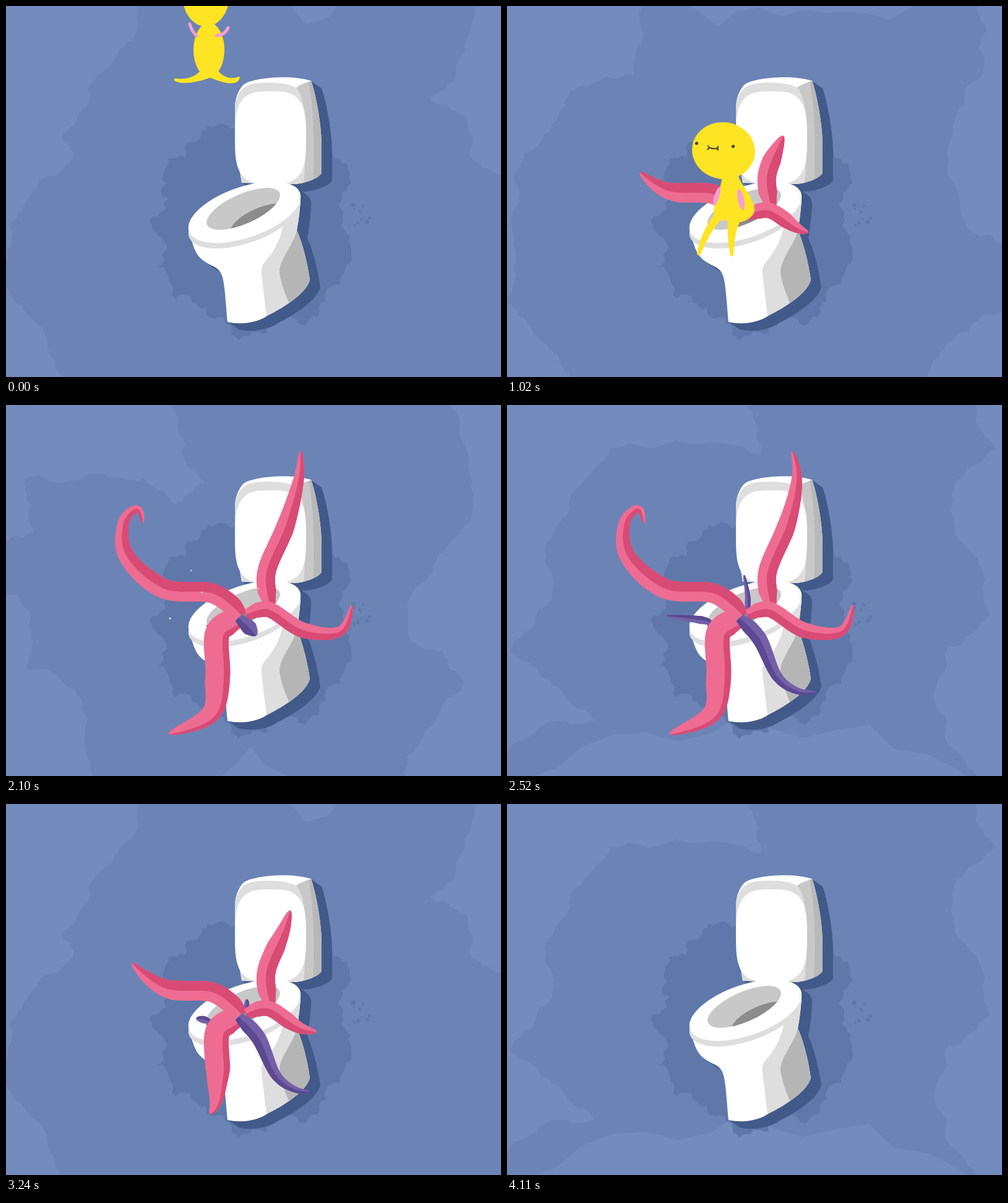
An HTML page with a canvas that plays this animation: 800 by 600 pixels, repeating every 4230 ms.

```html
<!DOCTYPE html>
<html>
<head>
<meta charset="utf-8">
<title>Toilet monster</title>
<style>
html, body { margin: 0; width: 100%; height: 100%; overflow: hidden; background: #6a83b5; }
canvas { display: block; }
</style>
</head>
<body>
<canvas id="stage" width="800" height="600"></canvas>
<script>
const ctx = document.getElementById('stage').getContext('2d');
const LOOP = 4230, STEP = 30, SCENE = 540;
const PINK = ['#ee6c92', '#d84b75'], PURPLE = ['#7360a9', '#5b4992'];
const YELLOW = '#ffe424', ARM = '#f39fd2', INK = '#4a4038';

let seed = 7;
const rand = () => (seed = seed * 16807 % 2147483647) / 2147483647;
const spread = r => (rand() * 2 - 1) * r;
const lerp = (a, b, k) => a + (b - a) * k;
const points = text => text.split(' ').map(p => p.split(',').map(Number));

// Smooth step from 0 to 1
function ease(t, start, length) {
  const u = Math.max(0, Math.min(1, (t - start) / length));
  return u * u * (3 - 2 * u);
}

function fill(c, color, d) {
  c.fillStyle = color;
  c.fill(new Path2D(d));
}

function line(c, color, width, d) {
  c.strokeStyle = color;
  c.lineWidth = width;
  c.lineCap = c.lineJoin = 'round';
  c.stroke(new Path2D(d));
}

function oval(c, color, x, y, rx, ry = rx, tilt = 0) {
  c.fillStyle = color;
  c.beginPath();
  c.ellipse(x, y, rx, ry, tilt, 0, 7);
  c.fill();
}

function polygon(c, color, pts) {
  c.fillStyle = color;
  c.beginPath();
  pts.forEach(p => c.lineTo(...p));
  c.fill();
}

// Closed superellipse; power 2 is an ellipse
function ring(x, y, rx, ry, power = 2, count = 60, jitter = 0) {
  const bend = v => Math.sign(v) * Math.abs(v) ** (2 / power);
  return Array.from({ length: count }, (_, i) => {
    const a = i / count * 2 * Math.PI, k = 1 + spread(jitter);
    return [x + rx * k * bend(Math.cos(a)), y + ry * k * bend(Math.sin(a))];
  });
}

// Ragged watercolour edge by midpoint displacement
function ragged(pts, amount, depth = 4) {
  if (!depth) return pts;
  const next = pts.flatMap((a, i) => {
    const b = pts[(i + 1) % pts.length], k = spread(amount / 2);
    return [a, [(a[0] + b[0]) / 2 - (b[1] - a[1]) * k, (a[1] + b[1]) / 2 + (b[0] - a[0]) * k]];
  });
  return ragged(next, amount, depth - 1);
}

const TANK = `M383,128C395,116 460,110 493,121C500,140 510,190 510,225V270
  C505,280 480,287 468,288L381,286C378,262 370,240 370,200V165C370,150 375,137 383,128Z`;
const BOWL = `M296,365C306,402 309,408 335,421C353,430 352,440 358,511
  C385,517 410,510 422,501C450,487 485,465 491,443C488,420 480,385 470,363Q476,330 476,305Z`;
const seat = (c, color, dy = 0) => oval(c, color, 385.5, 333.5 + dy, 95, 41, -.333);

function drawToilet(c) {
  for (let k = 1; k <= 8; k++) {
    c.save();
    c.translate(17 * k / 8, 12 * k / 8);
    fill(c, '#425a8a', TANK);
    fill(c, '#425a8a', BOWL);
    seat(c, '#425a8a');
    c.restore();
  }
  fill(c, '#fff', TANK);
  c.save();
  c.clip(new Path2D(TANK));
  fill(c, '#c8c8c8', 'M469,132Q478,125 495,121L512,290H468Z');
  fill(c, '#b8b8b8', 'M489,122H520V290H496Q501,180 489,122Z');
  fill(c, '#dedede', 'M365,190C370,130 385,124 425,124Q455,124 469,132C485,150 488,200 481,288H365Z');
  c.restore();
  polygon(c, '#fff', ring(427.5, 213, 57.5, 75, 3.2));
  fill(c, '#fff', BOWL);
  c.save();
  c.clip(new Path2D(BOWL));
  fill(c, '#dedede', 'M449,347C445,375 435,395 420,412Q411,421 413,435L422,510H520V290Z');
  fill(c, '#b5b5b5', 'M470,363C465,385 442,410 442,430Q444,450 458,482H520Z');
  c.restore();
  seat(c, '#dedede', 9);
  seat(c, '#fff');
  c.save();
  oval(c, '#c8c8c8', 383.5, 328, 64, 24, -.415);
  c.clip();
  oval(c, '#8c8c8c', 410, 347, 51, 20, -.415);
  c.restore();
}

// Outline of the darker wash on each paper
const scenes = [
  '210,-20 165,100 125,165 90,212 110,240 20,335 0,440 100,620 820,620 820,290 755,250 745,180 685,150 760,-20',
  '210,-20 205,110 115,130 55,220 10,330 0,480 75,560 148,620 680,620 720,540 820,485 820,390 745,360 725,180 770,100 750,-20',
  '250,-20 285,80 322,128 270,160 160,112 30,120 45,205 -20,240 -20,290 40,340 32,425 130,510 140,620 650,620 740,450 650,370 755,155 715,-20',
  '370,-20 410,80 165,70 100,160 75,285 5,400 140,510 -20,576 -20,620 770,620 690,470 780,340 720,160 790,70 745,-20'
].map(wash => {
  const cv = document.createElement('canvas');
  cv.width = 800;
  cv.height = 600;
  const c = cv.getContext('2d');
  c.fillStyle = '#738bbd';
  c.fillRect(0, 0, 800, 600);
  polygon(c, '#6b84b5', ragged(points(wash), .35));
  seed = 21;
  polygon(c, '#5f78a9', ragged(ring(400, 348, 158, 180, 2, 22, .08), .7, 3));
  for (let i = 0; i < 12; i++) oval(c, '#5f78a9', 570 + spread(18), 340 + spread(22), 1 + rand() * 2.5);
  drawToilet(c);
  return cv;
});
const ORDER = [0, 1, 0, 2, 3, 0, 2, 3];

// Catmull-Rom samples as [x, y, distance]
function curve(text) {
  const p = points(text), out = [];
  const at = i => p[Math.max(0, Math.min(p.length - 1, i))];
  let s = 0;
  for (let i = 0; i < p.length - 1; i++) for (let k = 0; k < 16; k++) {
    const u = k / 16, q = [0, 1].map(j => {
      const [a, b, c, d] = [-1, 0, 1, 2].map(o => at(i + o)[j]);
      return b + u / 2 * (c - a + u * (2 * a - 5 * b + 4 * c - d + u * (3 * b - a - 3 * c + d)));
    });
    const last = out[out.length - 1];
    if (last) s += Math.hypot(q[0] - last[0], q[1] - last[1]);
    out.push([...q, s]);
  }
  return out;
}

// out and back: [start, length] of growing and of retreating
const arm = (path, width, out, back, look) =>
  ({ pts: curve(path), width, out, back, side: 1, split: 0, slim: .25, colors: PINK, ...look });

const CLAW = { colors: PURPLE, slim: .5 };
const arms = {
  left: arm('382,341 335,305 255,297 195,245 190,190 213,167 222,192', 30, [820, 370], [2600, 1500]),
  up: arm('426,322 421,270 452,195 473,120 476,73', 28, [850, 360], [2740, 1180]),
  right: arm('388,339 425,331 480,364 540,366 560,322', 23, [830, 370], [2620, 1420]),
  front: arm('378,346 342,368 342,440 330,500 260,533', 38, [1380, 600], [2944, 828], { side: -1 }),
  claw: arm('376,344 408,378 436,438 468,462 501,465', 22, [1970, 430], [3130, 860], CLAW),
  hookLeft: arm('328,358 320,349 256,341', 11, [2050, 400], [2940, 500], CLAW),
  hookUp: arm('388,338 389,310 383,274', 8, [2050, 400], [2940, 500], CLAW)
};

function drawArm(a, t, { sway = 0, split = 0 } = {}) {
  const grown = ease(t, ...a.out) - ease(t, ...a.back);
  if (grown < .02) return;
  const total = a.pts[a.pts.length - 1][2] - .01, end = total * grown;
  const taper = end * (.25 + a.slim * grown);
  const spot = s => {
    const d = Math.max(0, Math.min(total, s));
    const i = Math.max(1, a.pts.findIndex(p => p[2] >= d)), p = a.pts[i - 1], q = a.pts[i];
    const k = (d - p[2]) / (q[2] - p[2]);
    return [lerp(p[0], q[0], k) + sway * (d / total) ** 6, lerp(p[1], q[1], k)];
  };
  const edge = pos => Array.from({ length: 61 }, (_, i) => {
    const s = end * i / 60, [x, y] = spot(s), [x0, y0] = spot(s - 3), [x1, y1] = spot(s + 3);
    const w = Math.min(1, .6 + s / 50) * Math.min(1, (end - s) / taper) ** .6 * a.width / 2 + 1;
    const k = pos * a.side * w / Math.hypot(x1 - x0, y1 - y0);
    return [x - (y1 - y0) * k, y + (x1 - x0) * k];
  });
  const dark = edge(1).reverse();
  polygon(ctx, a.colors[0], [...edge(-1), ...dark]);
  polygon(ctx, a.colors[1], [...edge(split), ...dark]);
}

function drawFalling() {
  oval(ctx, YELLOW, 323, -17, 38, 50);
  oval(ctx, YELLOW, 328, 71, 25, 44);
  fill(ctx, YELLOW, 'M272,117Q300,121 315,104H342Q356,122 378,114Q376,135 330,116Q290,130 272,121Z');
  line(ctx, ARM, 5, 'M297,29Q300,41 308,48M340,48Q354,47 359,35');
}

function drawSitting() {
  oval(ctx, YELLOW, 350, 234, 51, 46, .15);
  fill(ctx, YELLOW, `M348,270H374C372,285 398,305 400,328Q400,344 376,350Q368,365 366,402Q364,407 361,404
    Q355,370 357,350Q354,344 345,347Q328,365 313,401Q309,406 307,401Q312,370 334,338C334,310 347,300 348,270Z`);
  oval(ctx, ARM, 339, 308, 4, 16, .3);
  oval(ctx, ARM, 378, 313, 5, 17, -.2);
  oval(ctx, INK, 306.5, 222, 2.6);
  oval(ctx, INK, 365.5, 227, 2.6);
  line(ctx, INK, 2, 'M325,226l2,3l-3,3M327,229Q334,232 341,230M341,227Q339,230 341,233');
}

function drawGrabbed() {
  fill(ctx, YELLOW, `M292,320Q315,326 325,328Q338,318 352,328Q372,350 345,358Q320,366 291,373
    Q286,371 289,367Q315,363 325,354Q322,332 292,324Z`);
  fill(ctx, YELLOW, 'M354,300Q358,325 372,348L386,346Q378,322 388,300Z');
  oval(ctx, YELLOW, 376.5, 265, 51, 45);
  line(ctx, PINK[1], 6, 'M347,317Q356,334 373,341');
  oval(ctx, ARM, 335, 313, 4, 13, -.45);
  oval(ctx, ARM, 355, 336, 4, 19, -1.2);
  oval(ctx, INK, 342.5, 244, 2.6);
  oval(ctx, INK, 391.5, 255, 2.6);
  line(ctx, INK, 1.2, 'M339,248l4,1M389,259l4,0M359,244l4,-3M380,243l3,3M362,266l7,-1');
  const mouth = 'M354,262C357,251 376,250 380,265Q366,261 354,262Z';
  fill(ctx, '#e0474b', mouth);
  oval(ctx, '#fff', 368, 256, 5, 2);
  line(ctx, INK, 1.6, mouth);
}

// Draw moved by dx, dy and scaled about a point
function posed(draw, dx, dy, sx, sy, px, py) {
  ctx.save();
  ctx.translate(px + dx, py + dy);
  ctx.scale(sx, sy);
  ctx.translate(-px, -py);
  draw();
  ctx.restore();
}

function drawVictim(t) {
  const landed = 270, grabbed = 1440, age = (t - landed) / 60;
  const tug = ease(t, grabbed - 90, 180);
  if (t < landed) posed(drawFalling, 0, 232 * (Math.max(0, t - 30) / 240) ** 2, 1, 1, 0, 0);
  else if (t < grabbed) {
    const squash = .12 * Math.exp(-age / 1.5) * Math.cos(age * 2);
    posed(drawSitting, 27 * tug, 32 * tug, 1 + squash, 1 - squash, 350, 345);
  } else {
    const size = 1 - ease(t, 1620, 360);
    posed(drawGrabbed, -27 * (1 - tug), -32 * (1 - tug), size, size, 374, 338);
  }
}

function drawDrops(t) {
  const u = (t - 1980) / 120;
  if (u <= 0 || u > 2.5) return;
  seed = 5;
  for (let i = 0; i < 7; i++)
    oval(ctx, '#dfe7f5', 375 + spread(110) * u, 335 + (spread(80) - 45) * u + 30 * u * u, 1 + rand() * .6);
}

function draw(t) {
  ctx.drawImage(scenes[ORDER[Math.max(0, Math.floor((t - 60) / SCENE))]], 0, 0);
  drawArm(arms.hookUp, t);
  drawArm(arms.left, t);
  drawArm(arms.up, t, { sway: -22 * Math.sin((t - 2100) / 430) ** 2 });
  drawArm(arms.right, t);
  drawVictim(t);
  drawArm(arms.hookLeft, t);
  drawArm(arms.front, t, { split: lerp(-1, .5, ease(t, 1560, 300)) });
  drawArm(arms.claw, t);
  drawDrops(t);
}

function tick() {
  const t = performance.now() % LOOP;
  draw(Math.floor(t / STEP) * STEP);
  requestAnimationFrame(tick);
}
tick();
</script>
</body>
</html>
```
